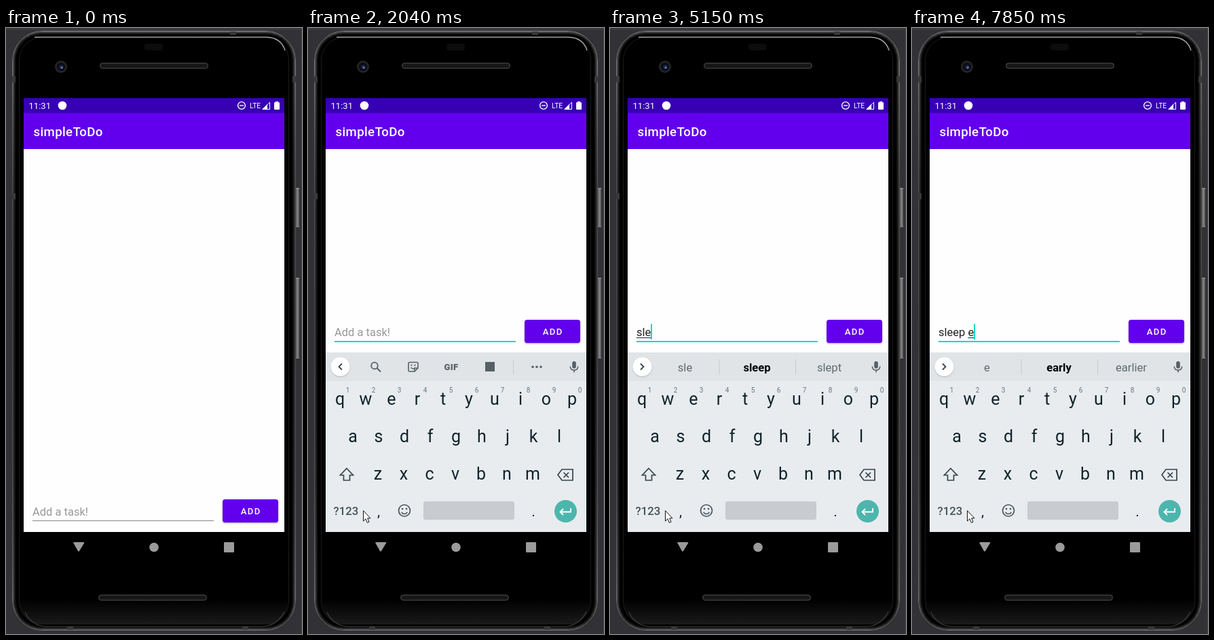
These frames come from a looping animation (436 px wide and 891 px high, 8000 ms). An HTML page with a canvas:

```html
<!DOCTYPE html>
<html lang="en">
<head>
<meta charset="utf-8">
<title>To-do entry</title>
<style>
html, body { margin: 0; width: 100%; height: 100%; overflow: hidden; background: #303035; }
canvas { display: block; width: 436px; height: 891px; }
</style>
</head>
<body>
<canvas id="stage"></canvas>
<script>
const W = 436, H = 891, LOOP = 8000;
const canvas = document.getElementById('stage');
const ratio = window.devicePixelRatio || 1;
canvas.width = W * ratio;
canvas.height = H * ratio;
const c = canvas.getContext('2d');

const TEAL = '#03dac5', PURPLE = '#6200ee', ICON = '#566167', INK = '#10232b';

// Pointer steps: start time, x, y
const pointer = [[500, 27, 691], [620, 43, 697], [740, 61, 704], [860, 76, 708], [980, 81, 709]];

// Caret toggles before typing starts
const blinks = [2040, 2570, 3070, 3600, 4000];

// Start time, text, word being composed, suggestions, caret visible, bold middle
const entries = [
  [4500, 's', 's', 's so sorry', true, true],
  [4780, 'sl', 'sl', 'sl sleep sleepy', true, true],
  [5150, 'sle', 'sle', 'sle sleep slept', true, true],
  [5270, 'slee', 'slee', 'slee sleep sleepy', true, true],
  [5520, 'sleep', 'sleep', 'sleep sleepe sleeping', true, false],
  [5770, 'sleep ', '', 'in well and', true, false],
  [6310, 'sleep ', '', 'in well and', false, false],
  [6430, 'sleep w', 'w', 'w with was', true, true],
  [6680, 'sleep wa', 'wa', 'wa was want', true, true],
  [7080, 'sleep w', 'w', 'w with was', true, true],
  [7200, 'sleep ', '', 'w with was', true, true],
  [7320, 'sleep ', '', 'in well and', true, false],
  [7850, 'sleep e', 'e', 'e early earlier', true, true]
];

const latest = (list, t) => list.filter(item => item[0] <= t).pop();

function rect(x, y, w, h, color) {
  c.fillStyle = color;
  c.fillRect(x, y, w, h);
}

function roundPath(x, y, w, h, r) {
  c.beginPath();
  c.roundRect(x, y, w, h, r);
}

function roundFill(x, y, w, h, r, color) {
  roundPath(x, y, w, h, r);
  c.fillStyle = color;
  c.fill();
}

function roundLine(x, y, w, h, r, color, width = 1) {
  roundPath(x, y, w, h, r);
  c.strokeStyle = color;
  c.lineWidth = width;
  c.stroke();
}

function disc(x, y, r, color) {
  c.beginPath();
  c.arc(x, y, r, 0, Math.PI * 2);
  c.fillStyle = color;
  c.fill();
}

function ring(x, y, r, color, width) {
  c.beginPath();
  c.arc(x, y, r, 0, Math.PI * 2);
  c.strokeStyle = color;
  c.lineWidth = width;
  c.stroke();
}

function shape(d, color) {
  c.fillStyle = color;
  c.fill(new Path2D(d));
}

function line(d, color, width) {
  c.strokeStyle = color;
  c.lineWidth = width;
  c.stroke(new Path2D(d));
}

function setFont(size, weight = 400, spacing = 0) {
  c.font = `${weight} ${size}px Roboto, sans-serif`;
  c.letterSpacing = spacing + 'px';
}

function label(text, x, y, size, color, weight = 400, align = 'left', spacing = 0) {
  setFont(size, weight, spacing);
  c.textAlign = align;
  c.fillStyle = color;
  c.fillText(text, x, y);
}

function fade(x0, y0, x1, y1, ...colors) {
  const g = c.createLinearGradient(x0, y0, x1, y1);
  colors.forEach((color, i) => g.addColorStop(i / (colors.length - 1), color));
  return g;
}

function speaker(x, y) {
  roundFill(x, y, 160, 9, 4.5, '#242424');
  c.save();
  roundPath(x + 2, y + 2, 156, 5, 2.5);
  c.clip();
  for (let i = 0; i < 80; i++) {
    line(`M${x + i * 2} ${y + 1}l2 3.5l-2 3.5`, '#050505', 0.8);
  }
  c.restore();
  roundLine(x + 0.5, y + 0.5, 159, 8, 4, '#3e3d3a');
}

function sideButton(y, h) {
  roundFill(426, y, 6, h, 2, fade(426, 0, 432, 0, '#2c2c2c', '#8c8c8c', '#505050'));
  rect(427, y, 5, 2, '#858585');
  rect(427, y + h - 2, 5, 2, '#777');
}

function drawPhone() {
  rect(0, 0, W, H, '#313136');
  rect(0, 0, W, 3, '#3b3b3f');
  rect(435, 0, 1, H, '#46464a');
  sideButton(235, 58);
  sideButton(367, 119);

  // Metal rim darkens towards the glass
  roundFill(9, 4, 418, 882, 43, '#000');
  const metal = fade(0, 4, 0, 886, '#9a9a9a', '#606060', '#585858', '#606060', '#8c8c8c');
  for (let i = 0; i < 6; i++) {
    c.globalAlpha = 0.8 * (1 - i / 6) ** 1.6;
    roundLine(9.5 + i, 4.5 + i, 417 - 2 * i, 881 - 2 * i, 43 - i, metal);
  }
  c.globalAlpha = 1;
  roundFill(19, 13, 398, 864, 34, fade(0, 840, 0, 877, '#000', '#1b1b1b'));
  roundLine(19.5, 13.5, 397, 863, 34, '#1c1c1c');
  line('M42 13.5H384Q405 14 411 33', '#a5a5a5', 1.4);
  line('M28 859Q37 878 57 880H380Q400 878 410 858', '#3e3e3e', 1.2);

  // Antenna seams
  [[9, 71, 5, 9], [9, 243, 5, 9], [422, 71, 5, 9],
   [330, 5, 9, 5], [90, 880, 9, 5], [348, 880, 9, 5]]
    .forEach(([x, y, w, h]) => rect(x, y, w, h, '#393939'));

  roundFill(204, 23, 27, 10, 4, '#0c0c0c');
  speaker(138, 51);
  speaker(136, 833);
  disc(81, 57, 9, '#252527');
  disc(81, 57, 6.3, '#0c0d14');
  disc(81.5, 57.5, 3, '#1d2a5c');
  disc(82.2, 58.2, 1.3, '#7487c8');

  shape('M100 756H114.5Q116 756 115 757.5L108 769Q107 770.5 106 769L99.5 757.5Q98.7 756 100 756Z', '#9b9b9b');
  disc(218, 763.5, 6.8, '#9b9b9b');
  roundFill(321, 756, 15, 15, 1.3, '#9b9b9b');
}

function drawApp() {
  rect(26, 103, 384, 638, '#fefefe');
  rect(26, 103, 384, 22, '#3700b3');
  rect(26, 125, 384, 53, PURPLE);
  label('11:31', 33.5, 119, 13.07, '#fff');
  disc(83, 114, 6.3, '#fff');
  ring(347, 114, 5.4, '#fff', 1.4);
  rect(344, 113.3, 6, 1.4, '#fff');
  label('LTE', 359, 118, 10.3, '#fff');
  shape('M377 120L385 112V120Z', '#fff');
  line('M378.2 119.5L388.5 109.2V119.5Z', '#fff', 1);
  roundFill(395, 109.3, 8, 10.7, 1, '#fff');
  rect(397, 108, 4, 2, '#fff');
  label('simpleToDo', 40.5, 159, 18.67, '#fff', 500, 'left', 0.33);
}

function drawForm(shift, focused, entry, caret) {
  const text = entry ? entry[1] : '', word = entry ? entry[2] : '';
  const at = y => Math.floor(y - shift);
  const base = at(717);
  if (text) label(text, 39, base, 16.5, '#202020');
  else label('Add a task!', 39, base, 16.5, '#989898');

  if (focused) rect(39, at(723.5), 267, 2, TEAL);
  else rect(39, 724, 267, 1, '#868686');

  setFont(16.5);
  const end = 39 + c.measureText(text).width;
  if (word) {
    const width = c.measureText(word).width;
    rect(end - width, base + 2, width, 1, '#202020');
  }
  if (caret) rect(Math.floor(end), at(699), 2, 23, TEAL);

  c.save();
  c.shadowColor = 'rgba(0,0,0,.3)';
  c.shadowBlur = 2 * ratio;
  c.shadowOffsetY = 1.2 * ratio;
  roundFill(319, at(693), 82, 34, 3.7, PURPLE);
  c.restore();
  label('ADD', 345.7, at(715), 13.07, '#fff', 500, 'left', 1.4);
}

function drawMic() {
  roundFill(389.2, 490, 5.6, 10.5, 2.8, ICON);
  line('M386.3 497.5Q386.5 503 392 503Q397.5 503 397.7 497.5M392 503V506.5', ICON, 1.6);
}

function drawTools() {
  line('M50 493.5L45.5 498L50 502.5', '#38444a', 1.8);
  ring(98, 496.5, 4.8, ICON, 1.8);
  line('M101.5 500L107 505.5', ICON, 2);
  line('M150 491.5H160Q162 491.5 162 493.5V500L157 505H150Q148 505 148 503V493.5Q148 491.5 150 491.5M162 500H157V505', ICON, 1.6);
  disc(152.5, 495.8, 1.1, ICON);
  disc(157.5, 495.8, 1.1, ICON);
  line('M151.5 499Q155 503 157.5 499.5', ICON, 1.3);
  label('GIF', 211, 502.5, 13, ICON, 900, 'center', 0.4);
  rect(261, 491, 14, 14, ICON);
  rect(302, 488, 1, 21, '#c8ccd0');
  [331, 337, 343].forEach(x => disc(x, 498.3, 1.8, ICON));
}

function drawSuggestions(entry) {
  line('M45 493.5L49.5 498L45 502.5', '#38444a', 1.8);
  rect(160.5, 487, 1, 22, '#c5cacd');
  rect(273, 487, 1, 22, '#c5cacd');
  entry[3].split(' ').forEach((word, i) => {
    const strong = i === 1 && entry[5];
    label(word, [110.5, 216.5, 323][i], 504.7, 16.6,
      strong ? '#000' : '#5f6a70', strong ? 700 : 400, 'center');
  });
}

function drawKeyboard(entry) {
  rect(26, 477, 384, 264, '#e8ecef');
  rect(26, 477, 384, 42, '#e0e4e7');
  c.save();
  c.shadowColor = 'rgba(0,0,0,.2)';
  c.shadowBlur = 2 * ratio;
  c.shadowOffsetY = ratio;
  disc(47.5, 498, 14, '#fff');
  c.restore();
  if (entry) drawSuggestions(entry);
  else drawTools();
  drawMic();

  [['qwertyuiop', 47, 554], ['asdfghjkl', 66, 609], ['zxcvbnm', 103, 664]]
    .forEach(([keys, x, y]) => [...keys].forEach((key, i) =>
      label(key, x + i * 38, y, 25, INK, 400, 'center')));
  [...'1234567890'].forEach((digit, i) =>
    label(digit, 58.5 + i * 38, 536, 10, '#69757b', 400, 'center'));

  line('M57 647.5L66.5 657.5H61.5V665H52.5V657.5H47.5Z', '#35444b', 1.7);
  line('M374 649H390V665H374L368 657Z', '#35444b', 1.7);
  line('M376.5 653.5L384 661M384 653.5L376.5 661', '#35444b', 1.7);
  label('?123', 37.5, 716, 16.8, '#46535a', 500);
  label(',', 104, 717.5, 21, INK, 400, 'center');
  label('.', 332, 717.5, 21, INK, 400, 'center');
  ring(142, 709.5, 8.5, '#46535a', 1.7);
  disc(139, 707, 1.3, '#46535a');
  disc(145, 707, 1.3, '#46535a');
  line('M137.8 711.8Q139 714.5 142 714.5Q145 714.5 146.2 711.8', '#46535a', 1.6);
  roundFill(170, 696, 134, 27, 3, '#c8ccd0');
  disc(379.5, 710.5, 16.5, '#4db6ac');
  line('M387 706V711.5H372M376 707L371.5 711.5L376 716', '#fff', 1.9);
}

function drawPointer(x, y) {
  c.save();
  c.translate(x, y);
  const d = 'M.5 .7V16L4 12.7L6.3 18.3L9 17.2L6.7 11.8H11Z';
  shape(d, '#fff');
  line(d, '#111', 1);
  c.restore();
}

function draw(t) {
  c.setTransform(ratio, 0, 0, ratio, 0, 0);
  const open = t >= 2040, focused = t >= 1740;
  const entry = latest(entries, t);
  const toggles = blinks.filter(time => time <= t).length;
  const caret = entry ? entry[4] : focused && toggles % 2 === 0;

  drawPhone();
  drawApp();
  drawForm(open ? 263.5 : 0, focused, entry, caret);
  if (open) drawKeyboard(entry);
  const spot = latest(pointer, t);
  if (spot) drawPointer(spot[1], spot[2]);
}

function tick(now) {
  draw(now % LOOP);
  requestAnimationFrame(tick);
}
requestAnimationFrame(tick);
</script>
</body>
</html>
```
